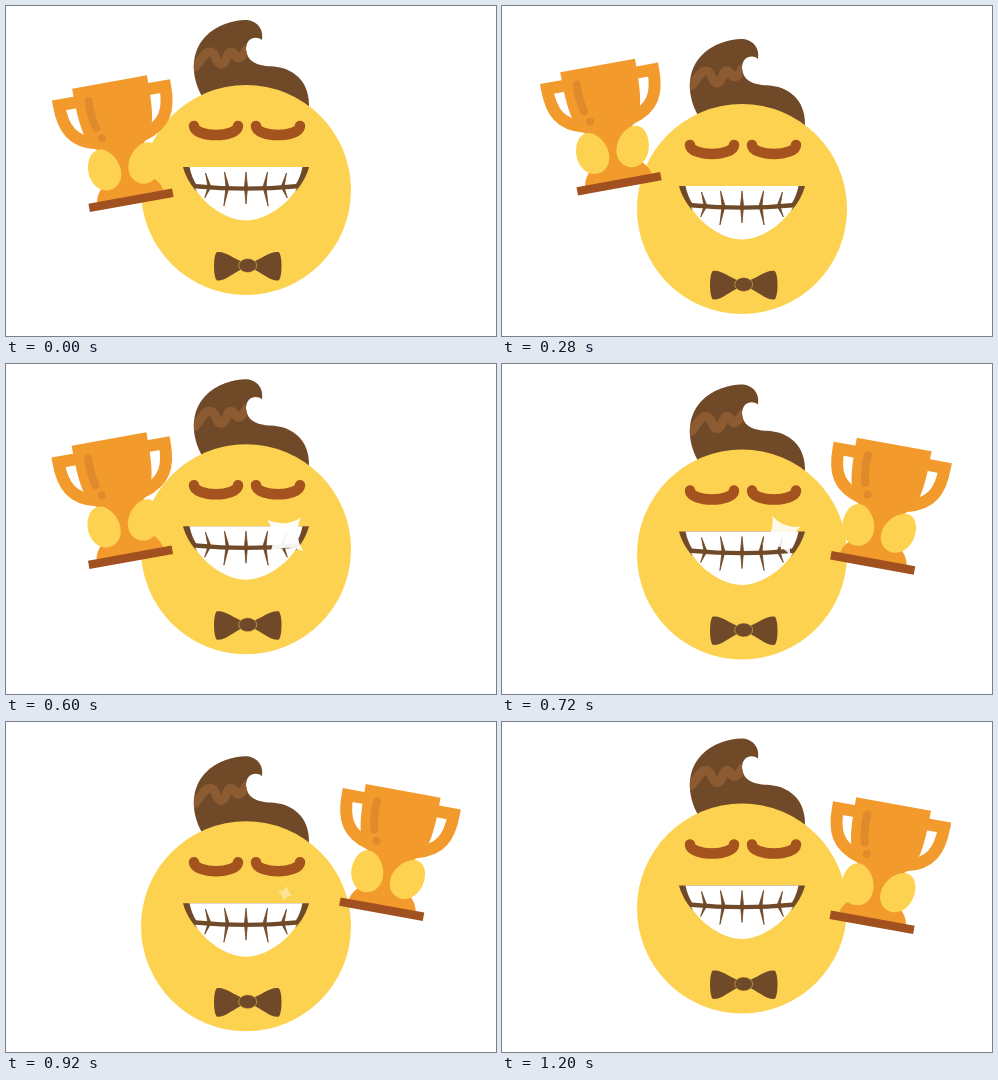
Recreate the animation shown at these times as an HTML page. Size 490 by 330 pixels, loop 1.24 s.

```html
<!DOCTYPE html>
<html lang="en">
<head>
<meta charset="utf-8">
<title>Winner</title>
<style>
  html, body { margin: 0; width: 100%; height: 100%; overflow: hidden; background: #fff; }
  svg { display: block; width: 490px; height: 330px; }
  .skin { fill: #fcd250; }
  .hair { fill: #704a28; }
  .gold { fill: #f29b2c; }
  .rust { fill: #a0511f; }
  .line { fill: none; stroke-linecap: round; }
</style>
</head>
<body>
<svg viewBox="0 0 490 330">
  <defs>
    <path id="quiff" d="M197 92C184 70 185 46 199 31C210 19 228 14 239 14C250 14 258 22 256 34C250 29 240 32 240 43C241 57 253 60 268 60.500C292 63 304 80 303 101L240 120Z"/>
    <clipPath id="quiffClip"><use href="#quiff"/></clipPath>
    <path id="eye" class="line" stroke="#a4521e" stroke-width="10.500" d="M188 120C189 132 231 132 232 120"/>
    <path id="wing" d="M211 246C220 245 228 253 237 256V263C228 266 220 275 211 274.500C207 272 207 248 211 246Z"/>
    <path id="handle" class="line" stroke="#f29b2c" stroke-width="12" style="stroke-linecap:butt" d="M-34 14H-54C-54 38 -47 52 -24 58"/>
    <path id="egg" d="M0 -21C9 -21 16 -9 16 2C16 13 9 21 0 21C-9 21 -16 13 -16 2C-16 -9 -9 -21 0 -21Z"/>
  </defs>

  <g id="face">
    <use href="#quiff" class="hair"/>
    <path class="line" clip-path="url(#quiffClip)" stroke="#8c5b31" stroke-width="9"
      d="M189 61C194 56 198 46 204 46C210 46 210 58 215 58C221 58 220 46 225 46C229 46 229 53 233 52C237 51 238 47 240 44"/>
    <circle class="skin" cx="240" cy="184" r="105"/>
    <use href="#eye"/>
    <use href="#eye" x="62"/>
    <path class="hair" d="M177 161H303C301 169 296 178 290 185Q240 190 190 185C184 178 179 169 177 161Z"/>
    <g fill="#fff">
      <path d="M183.500 161H296.500C295 168 293 173 290 178Q240 183 190 178C187 173 185 168 183.500 161Z"/>
      <path d="M189 182.500Q240 187 291 182.500C281 199 259 214.500 240 214.500C221 214.500 199 199 189 182.500Z"/>
    </g>
    <g id="gaps" class="hair" stroke="#704a28" stroke-width=".8"></g>
    <g class="hair">
      <use href="#wing"/>
      <use href="#wing" transform="matrix(-1 0 0 1 483.500 0)"/>
      <ellipse cx="241.700" cy="259.500" rx="9" ry="7" stroke="#fcd250" stroke-width=".5"/>
    </g>
  </g>

  <path id="spark" fill="#fff" d="M0 -1Q.24 -.24 1 0Q.24 .24 0 1Q-.24 .24 -1 0Q-.24 -.24 0 -1Z"/>

  <g id="trophy">
    <use href="#handle"/>
    <use href="#handle" transform="scale(-1 1)"/>
    <path class="gold" d="M-38 0H38C38 40 36 58 20 68L18 90C22 102 32 104 34 117H-34C-32 104 -22 102 -18 90L-20 68C-36 58 -38 40 -38 0Z"/>
    <path class="line" stroke="#df8b2b" stroke-width="8" d="M-24 15Q-25 30 -21.500 43"/>
    <circle cx="-17.300" cy="54" r="4" fill="#df8b2b"/>
    <rect class="rust" x="-42.500" y="116" width="85" height="8.500"/>
    <g class="skin">
      <use href="#egg" transform="translate(-21 85.500) rotate(-10)"/>
      <use href="#egg" transform="translate(20.500 86) rotate(24)"/>
    </g>
  </g>
</svg>

<script>
  const LOOP = 1240, HALF = LOOP / 2, TICK = 40;
  const $ = id => document.getElementById(id);
  const face = $('face'), trophy = $('trophy'), spark = $('spark');

  // Tapered gaps between the teeth, widest at the bite line
  const gap = ([x, lean, up, down]) =>
    `M${x + lean} ${181 - up}L${x + 1.5} 181L${x + lean * 1.2} ${181 + down}L${x - 1.5} 181Z`;
  const side = [[18.5, 3, 15, 19], [36.5, 4, 14, 11]];
  const teeth = [[240, 0, 15, 17]];
  for (const [x, lean, up, down] of side)
    for (const s of [-1, 1]) teeth.push([240 + s * x, s * lean, up, down]);
  $('gaps').innerHTML = `<path d="${teeth.map(gap).join('')}"/>`;

  // Smooth curve through [time, value] points
  function track(points, t) {
    const last = points.length - 1;
    let i = 0;
    while (i < last - 1 && t > points[i + 1][0]) i++;
    const slope = k => {
      const a = points[Math.max(0, k - 1)], b = points[Math.min(last, k + 1)];
      return (b[1] - a[1]) / (b[0] - a[0]);
    };
    const [t0, a] = points[i], [t1, b] = points[i + 1];
    const d = t1 - t0, u = (t - t0) / d, v = 1 - u;
    return v * v * (1 + 2 * u) * a + u * u * (3 - 2 * u) * b
      + d * u * v * (v * slope(i) - u * slope(i + 1));
  }

  const left = { x: 103.5, y: 76, dx: -.48, tilt: -10.3,
    lift: [[0, 0], [160, 16.7], [220, 18.5], [400, 11], [600, 1], [640, 0]] };
  const right = { x: 390.7, y: 84, dx: .43, tilt: 10.3,
    lift: [[640, 0], [840, 9], [950, 16.5], [1040, 13], [1200, 2], [1240, 0]] };

  function bob(t) {
    const u = 1 - Math.abs(t % HALF / HALF * 2 - 1);
    return 20.8 * (.9 * u + .05 * (1 - Math.cos(Math.PI * u)));
  }

  function draw(t) {
    face.setAttribute('transform', `translate(0 ${bob(t)})`);

    const p = t < HALF ? left : right;
    const lift = track(p.lift, t);
    trophy.setAttribute('transform',
      `translate(${p.x + p.dx * lift} ${p.y - lift}) rotate(${p.tilt})`);

    const grow = Math.max(0, Math.min((t - 325) / 315, (1030 - t) / 390));
    const spin = (t - 400) * 90 / 440;
    spark.setAttribute('transform', `translate(279.3 171.5) rotate(${spin}) scale(${27 * grow})`);
    spark.setAttribute('opacity', grow && Math.min(1, .15 + .9 * grow));
  }

  const start = performance.now();
  function frame() {
    const t = (performance.now() - start) % LOOP;
    draw(Math.floor(t / TICK) * TICK);
    requestAnimationFrame(frame);
  }
  frame();
</script>
</body>
</html>
```
